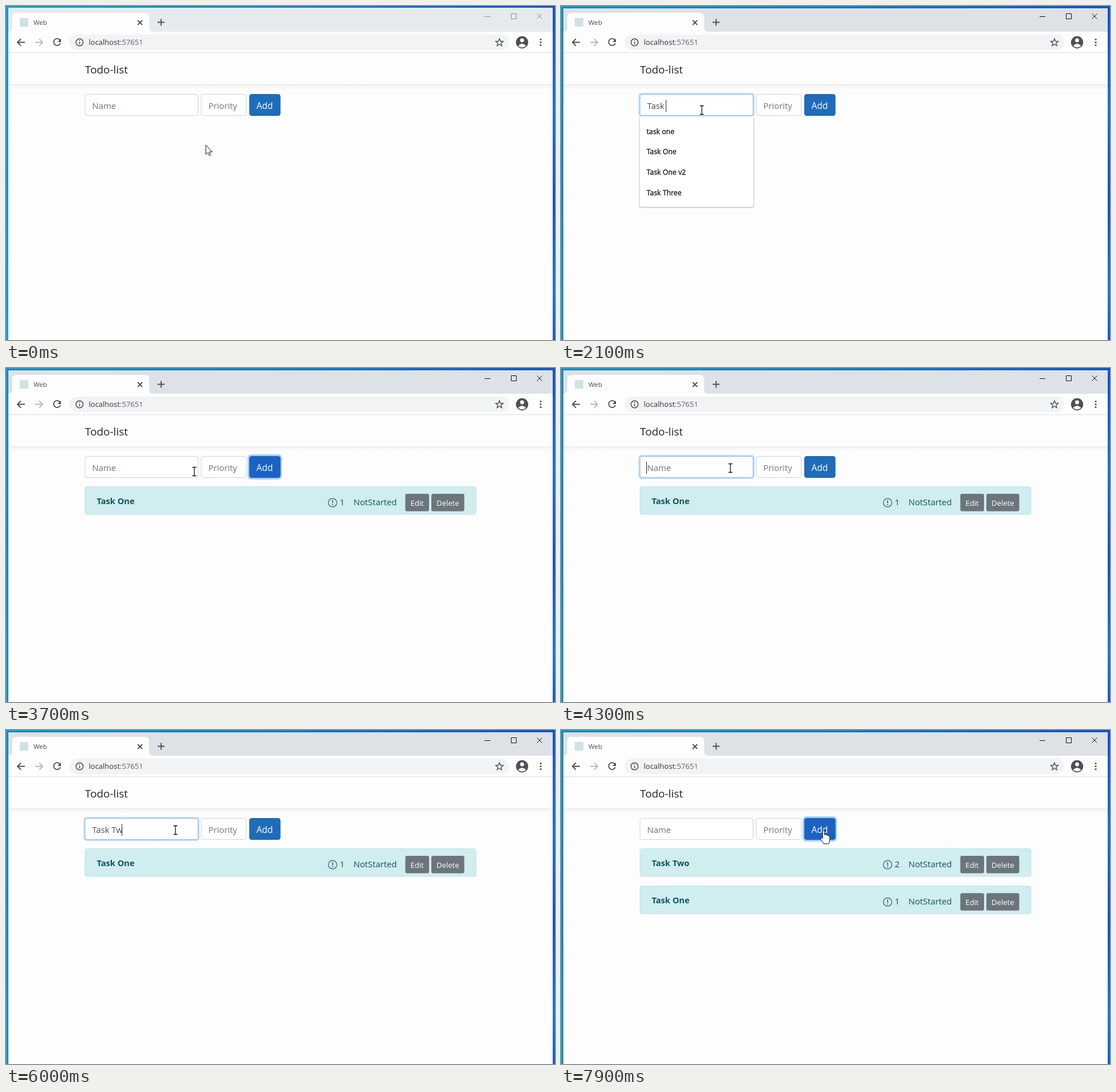
Animation, 959 px wide and 584 px high, one loop 8 s. Source, as an HTML page:

```html
<!DOCTYPE html>
<html lang="en">
<head>
<meta charset="utf-8">
<title>Todo-list</title>
<style>
  html, body { margin: 0; width: 100%; height: 100%; overflow: hidden; }
  svg { display: block; width: 959px; height: 584px; font-family: "Open Sans", "Noto Sans", sans-serif; }
  text { white-space: pre; }
  .field { fill: #fff; stroke: #ced4da; }
  .hint { font-size: 14.8px; fill: #6c757d; }
  .icon { fill: none; stroke: #4b4e52; stroke-width: 1.8; }
  .info { fill: #0c5460; font-size: 14.8px; }
  .small { fill: #fff; font-size: 13.1px; }
</style>
</head>
<body>
<svg viewBox="0 0 959 584">
  <defs>
    <linearGradient id="desk" x2="1" y2="0">
      <stop offset="0" stop-color="#08a0cf"/><stop offset=".5" stop-color="#0787d8"/><stop offset="1" stop-color="#0a56d4"/>
    </linearGradient>
    <linearGradient id="deskLeft" x2="0" y2="1">
      <stop offset="0" stop-color="#0b9ed0"/><stop offset=".5" stop-color="#0a92e6"/><stop offset="1" stop-color="#12a4cc"/>
    </linearGradient>
    <linearGradient id="deskRight" x2="0" y2="1">
      <stop offset="0" stop-color="#0a50dc"/><stop offset=".3" stop-color="#0f70e4"/>
      <stop offset=".58" stop-color="#0a50d0"/><stop offset=".85" stop-color="#0c7ae0"/>
      <stop offset="1" stop-color="#0a5cdc"/>
    </linearGradient>
    <linearGradient id="fall" x2="0" y2="1">
      <stop offset="0" stop-color="#000" stop-opacity=".07"/><stop offset="1" stop-color="#000" stop-opacity="0"/>
    </linearGradient>
    <filter id="soft" x="-10%" y="-10%" width="120%" height="120%"><feGaussianBlur stdDeviation="1.3"/></filter>
  </defs>

  <rect width="959" height="584" fill="url(#desk)"/>
  <rect y="3" width="4" height="581" fill="url(#deskLeft)"/>
  <rect x="955" y="3" width="4" height="581" fill="url(#deskRight)"/>
  <rect x="4" y="3" width="951" height="581" fill="#fdfdfd"/>
  <rect id="bar" x="4" y="3" width="951" height="42"/>
  <path id="edge" d="M3.500 584V3.500H955" fill="none" stroke="#1b5f8c"/>

  <path d="M4 45q7 0 7-8V20q0-8 8-8H242q8 0 8 8V37q0 8 7 8Z" fill="#fdfdfd"/>
  <rect x="24" y="21" width="15" height="15" fill="#cfe2e6"/>
  <text x="48" y="33" font-size="11.400" fill="#45484c">Web</text>
  <path class="icon" d="M230 25l8 8m0-8l-8 8"/>
  <path class="icon" d="M265 28.500h12m-6-6v12"/>
  <g id="controls" fill="none"><path d="M836 18.500h10M882.500 13.500h9v9h-9zM927.500 13.500l9 9m0-9l-9 9"/></g>

  <path class="icon" d="M33 63.500H20m6-6l-6 6 6 6"/>
  <path class="icon" d="M51 63.500h13m-6-6l6 6-6 6" style="stroke:#b7b9bc"/>
  <path class="icon" d="M94.500 60a6 6 0 1 0 .5 5"/>
  <path d="M96 57v6h-6z" fill="#4b4e52"/>
  <rect x="111" y="50" width="768" height="27" rx="13.500" fill="#f1f3f4"/>
  <g class="icon" style="stroke-width:1.5"><circle cx="128.500" cy="63.500" r="6.200"/><path d="M128.500 62.500v4.500m0-7.500v1.500"/></g>
  <text x="144.500" y="68" font-size="13" fill="#606468"><tspan fill="#303236">localhost</tspan>:57651</text>
  <path id="star" class="icon" style="stroke-width:1.400"/>
  <circle cx="901.500" cy="63.500" r="10.700" fill="#4d5054"/>
  <circle cx="901.500" cy="60" r="3.400" fill="#fff"/>
  <path d="M894.500 69.500q7-7 14 0-7 6-14 0Z" fill="#fff"/>
  <g fill="#4b4e52"><circle cx="934" cy="58.500" r="1.600"/><circle cx="934" cy="63.500" r="1.600"/><circle cx="934" cy="68.500" r="1.600"/></g>
  <path d="M4 81.500H955" stroke="#dedfe2"/>

  <text x="138" y="118" font-size="18.900" fill="#212529">Todo-list</text>
  <path d="M4 137.500H955" stroke="#e5e6e6"/>
  <rect x="4" y="138" width="951" height="10" fill="url(#fall)" opacity=".5"/>

  <rect id="nameRing" x="135.500" y="152" width="202.500" height="42" rx="5" fill="#bfdeff"/>
  <rect id="nameBox" class="field" x="138" y="154.500" width="197.500" height="37" rx="3.500"/>
  <text id="nameText" class="hint" x="150.500" y="180"></text>
  <path id="caret" stroke="#222"/>
  <rect class="field" x="341" y="154.500" width="78.500" height="37" rx="3.500"/>
  <text class="hint" x="353.500" y="180">Priority</text>
  <rect id="addRing" x="422" y="151" width="60" height="44" rx="6" fill="#a3d0f4"/>
  <rect id="addBox" x="425.500" y="154.500" width="53.500" height="37" rx="3.500" stroke="#1861ac"/>
  <text x="437.500" y="179.500" font-size="15.400" fill="#fff">Add</text>

  <g id="cards"></g>
  <g id="menu">
    <rect id="menuShade" x="137" y="194" width="199.500" fill="#000" opacity=".32" filter="url(#soft)" rx="2"/>
    <rect id="menuBox" x="137.500" y="193" width="198.500" fill="#fff" rx="2"/>
    <g id="menuItems" font-size="12.300" fill="#111" stroke="#111" stroke-width=".3"></g>
  </g>

  <g id="arrow"><path d="M0 0V16.500L3.800 13 6.300 18.700 8.700 17.600 6.200 12H11.300Z" fill="#fff" stroke="#111"/></g>
  <g id="beam"><path d="M-3.500-7.500h3l.5 1 .5-1h3M0-7V7M-3.500 7.500h3l.5-1 .5 1h3" fill="none" stroke="#111" stroke-width="1.300"/></g>
  <g id="hand"><path d="M-2 1Q-2-.5-.3-.5T1.500 1V7.500Q4.500 5.500 5 8 7.500 6.500 8 9 10.500 8.500 10.500 11V16Q10 20 8.500 23H0Q-1.500 20-4.500 16.500-6.500 13.500-5 12.500T-2 14Z" fill="#fff" stroke="#111"/></g>
</svg>
<script>
const LOOP = 8000, STEP = 100;
const $ = id => document.getElementById(id);
const show = (id, on) => { $(id).style.display = on ? "" : "none"; };
const within = (t, ...spans) => spans.some(([from, to]) => t >= from && t < to);

const history = ["task one", "Task One", "TaskOne", "task", "Task One v2", "Task Three"];
const entries = [
  { text: "Task One", keys: [1600, 1700, 1900, 2000, 2100, 2300, 2400, 2600], focus: 900, add: 3300 },
  { text: "Task Two", keys: [4700, 4900, 5100, 5300, 5400, 5800, 5900, 6100], focus: 4100, add: 7200 }
];
// time, x and y of the pointer's hot spot
const pointerPath = [
  [0, 349, 243], [200, 342, 238], [700, 243, 184], [1800, 243, 184], [2100, 246, 182],
  [2700, 246, 182], [3100, 453, 175], [3400, 453, 175], [3700, 329, 181],
  [4000, 296, 175], [6200, 296, 175], [6700, 454, 174], [7100, 454, 174], [7500, 459, 176], [8000, 459, 176]
];

const measure = document.createElement("canvas").getContext("2d");
function textWidth(text) {
  measure.font = '14.8px "Open Sans", "Noto Sans", sans-serif';
  return measure.measureText(text).width;
}

function pointerAt(t) {
  const i = pointerPath.findIndex(p => p[0] > t);
  const [t0, x0, y0] = pointerPath[i - 1], [t1, x1, y1] = pointerPath[i];
  const u = (t - t0) / (t1 - t0), e = u * u * (3 - 2 * u);
  return [x0 + (x1 - x0) * e, y0 + (y1 - y0) * e];
}

function button(x, width, label) {
  return `<rect x="${x}" y="220" width="${width}" height="30.500" rx="3" fill="#6c757d"/>
    <text class="small" x="${x + 9}" y="240.500">${label}</text>`;
}

function card(row, name, priority) {
  return `<g transform="translate(0 ${row * 65.300})">
    <rect x="138" y="207.500" width="683" height="48.500" rx="3.500" fill="#d0edef" stroke="#bee5eb"/>
    <text x="158.500" y="237.500" font-size="14.600" font-weight="700" fill="#0c5460">${name}</text>
    <circle cx="570.500" cy="235.500" r="7.400" fill="none" stroke="#2b666e" stroke-width="1.200"/>
    <path d="M570.500 231v5.500m0 1.500v2" stroke="#1f5f68" stroke-width="1.500"/>
    <text class="info" x="583" y="239.500">${priority}</text>
    <text class="info" x="607" y="239.500">NotStarted</text>
    ${button(697.5, 41.5, "Edit")}${button(743, 57.5, "Delete")}</g>`;
}

function drawMenu(items) {
  show("menu", items.length > 0);
  const height = 15.5 + items.length * 35.7;
  $("menuBox").setAttribute("height", height);
  $("menuShade").setAttribute("height", height);
  $("menuItems").innerHTML = items.map((s, i) => `<text x="149.500" y="${223.5 + i * 35.7}">${s}</text>`).join("");
}

function drawName(t) {
  const entry = entries.find(e => t >= e.focus && t < e.add);
  const typed = entry ? entry.keys.filter(k => k <= t).length : 0;
  const value = entry ? entry.text.slice(0, typed) : "";
  const focused = within(t, [900, 3200], [4100, 7100]);
  $("nameText").textContent = value || "Name";
  $("nameText").style.fill = value ? "#495057" : "";

  const ring = focused ? Math.min(1, (t - entry.focus) / 150) : 0;
  $("nameRing").setAttribute("opacity", ring);
  $("nameBox").style.stroke = ring ? "#82b9f8" : "";

  const lastKey = entry ? (typed ? entry.keys[typed - 1] : entry.focus) : 0;
  show("caret", focused && (t - lastKey) % 1000 < 500);
  const x = Math.floor(150.5 + textWidth(value)) - .5;
  $("caret").setAttribute("d", `M${x} 164V185`);

  const open = within(t, [1600, 2800], [4500, 6300]);
  drawMenu(open ? history.filter(h => h.toLowerCase().startsWith(value.toLowerCase())) : []);
}

function drawPointer(t) {
  const [x, y] = pointerAt(t);
  const inRow = y > 154 && y < 192;
  const overAdd = inRow && x > 425 && x < 480;
  const kind = overAdd ? "hand" : inRow && x > 138 && x < 420 ? "beam" : "arrow";
  for (const id of ["arrow", "beam", "hand"]) show(id, id === kind);
  $(kind).setAttribute("transform", `translate(${Math.round(x)} ${Math.round(y)})`);
  return overAdd;
}

function draw(t) {
  const active = t >= 800;
  show("edge", active);
  $("bar").setAttribute("fill", active ? "#dee1e6" : "#e7eaed");
  $("controls").setAttribute("stroke", active ? "#111" : "#8d8e92");

  drawName(t);
  const overAdd = drawPointer(t);
  const addFocused = within(t, [3200, 4100], [7100, LOOP]);
  show("addRing", addFocused);
  $("addBox").setAttribute("fill", overAdd || addFocused ? "#1b62c4" : "#1f6cba");

  const added = entries.filter(e => t >= e.add);
  $("cards").innerHTML = added.map((e, i) => card(added.length - 1 - i, e.text, i + 1)).join("");
}

const starPoints = Array.from({ length: 10 }, (_, i) => {
  const r = i % 2 ? 3 : 6.8, a = i * Math.PI / 5;
  return `${862 + r * Math.sin(a)} ${64 - r * Math.cos(a)}`;
});
$("star").setAttribute("d", `M${starPoints.join("L")}Z`);

const start = performance.now();
function tick() {
  const t = (performance.now() - start) % LOOP;
  draw(Math.floor(t / STEP) * STEP);
  requestAnimationFrame(tick);
}
tick();
</script>
</body>
</html>
```
